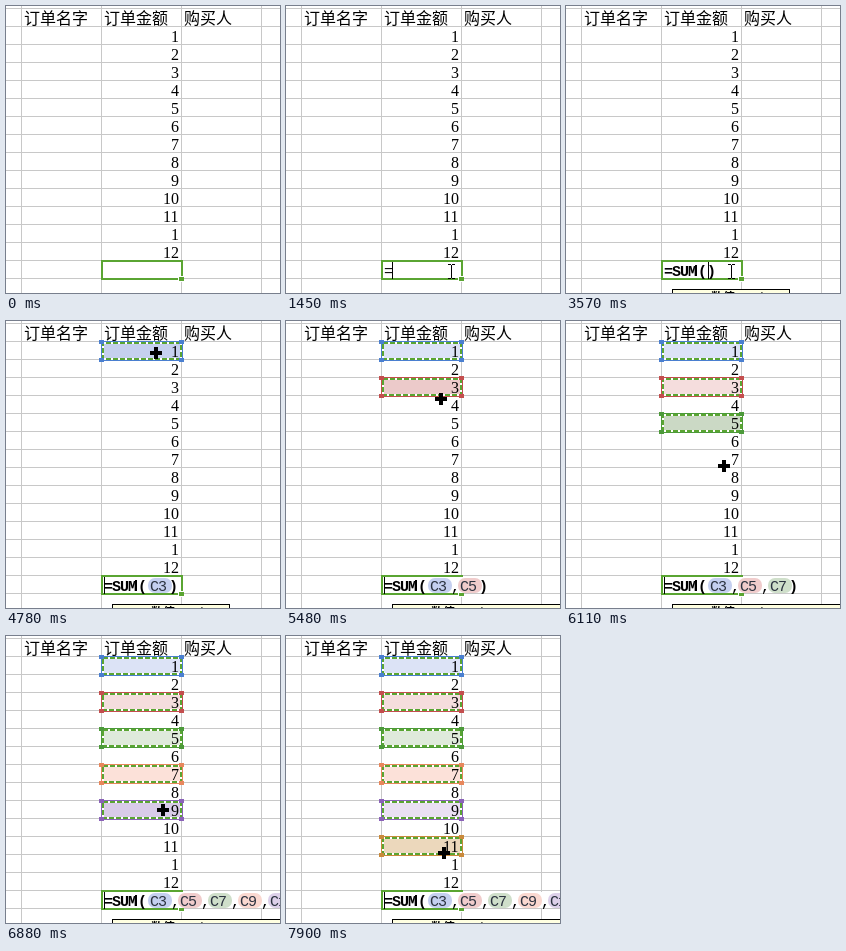
An HTML page with a canvas for the animation above (8000 ms loop, 274x287 px).

```html
<!DOCTYPE html>
<html lang="zh">
<head>
<meta charset="utf-8">
<style>
  html, body { margin: 0; width: 100%; height: 100%; overflow: hidden; background: #fff; }
  canvas { display: block; }
</style>
</head>
<body>
<canvas id="stage" width="274" height="287"></canvas>
<script>
const ctx = document.getElementById('stage').getContext('2d');
const LOOP = 8000, ROW = 18, LEFT = 95, EDIT_Y = 254;
const GREEN = '#5aa532';
const MONO = '15px "Liberation Mono", monospace';
const DIGITS = '16px "Liberation Serif", serif';
const CJK = '"Noto Sans CJK SC", "Noto Sans CJK", sans-serif';
const amounts = [1, 2, 3, 4, 5, 6, 7, 8, 9, 10, 11, 1, 12];

// Ranges picked one after another: every second row from C3 on.
const ranges = [
  { at: 4650, dark: '#4a7fd0', fill: '#dce3f6', active: '#c5d0ee', chip: '#c5d0f0' },
  { at: 5280, dark: '#c44e4e', fill: '#f5dddd', active: '#eccaca', chip: '#f0cccc' },
  { at: 5800, dark: '#4c9a3a', fill: '#dfeadb', active: '#cbd9c5', chip: '#cfdfca' },
  { at: 6320, dark: '#e8875c', fill: '#fce1d9', active: '#f3d1c6', chip: '#fad8d0' },
  { at: 6820, dark: '#8a62b8', fill: '#eae0f3', active: '#d9cbe8', chip: '#ddd0ea' },
  { at: 7300, dark: '#c98a3c', fill: '#f3e4cf', active: '#ecd8bc', chip: '#f0dcc0' }
];

// Pointer waypoints: time, x, y
const path = [
  [190, 187, 287], [330, 178, 258], [430, 166, 242], [570, 165, 265],
  [3820, 165, 265], [4100, 210, 190], [4400, 185, 70], [4600, 150, 32],
  [4900, 150, 32], [5200, 155, 66], [5320, 155, 66], [5740, 156, 102],
  [5850, 156, 102], [6110, 158, 145], [6350, 158, 139], [6780, 157, 174],
  [6950, 157, 174], [7250, 159, 209], [7480, 182, 232], [7720, 158, 213],
  [7880, 158, 217], [8000, 158, 217]
];

function rect(x, y, w, h, color) {
  ctx.fillStyle = color;
  ctx.fillRect(x, y, w, h);
}

function outline(x, y, w, h, color, width) {
  ctx.lineWidth = width;
  ctx.strokeStyle = color;
  ctx.strokeRect(x, y, w, h);
}

function text(str, x, y, font, color = '#000', spacing = '0px') {
  ctx.font = font;
  ctx.letterSpacing = spacing;
  ctx.fillStyle = color;
  ctx.fillText(str, x, y);
}

const code = (str, x, weight = '', color = '#000') =>
  text(str, x, 270, weight + ' ' + MONO, color, '-1px');

const caret = x => rect(x, 256, 1, 17, '#000');

function pointerAt(t) {
  const i = path.findIndex(p => p[0] > t);
  if (i < 1) return null;
  const [t0, x0, y0] = path[i - 1], [t1, x1, y1] = path[i];
  const u = (t - t0) / (t1 - t0), e = u * u * (3 - 2 * u);
  return [Math.round(x0 + (x1 - x0) * e), Math.round(y0 + (y1 - y0) * e)];
}

function drawSheet() {
  rect(0, 0, 274, 287, '#fff');
  for (let x = 15; x < 274; x += 80) rect(x, 0, 1, 287, '#c8c8c8');
  for (let y = 2; y < 287; y += ROW) rect(0, y, 274, 1, '#c8c8c8');
  ['订单名字', '订单金额', '购买人'].forEach((title, i) =>
    text(title, 18 + 80 * i, 18, '300 16px ' + CJK));
}

function drawRange(range, i, isActive, t) {
  const y = 20 + 2 * ROW * i;
  rect(LEFT, y, 81, 19, isActive ? range.active : range.fill);
  outline(LEFT + 0.5, y + 0.5, 81, 19, range.dark, 1);
  outline(LEFT + 2, y + 2, 78, 16, '#fff', 2);
  ctx.setLineDash([5, 2]);
  ctx.lineDashOffset = -Math.floor(t / 65);
  outline(LEFT + 2, y + 2, 78, 16, GREEN, 2);
  ctx.setLineDash([]);
  for (const dx of [0, 80])
    for (const dy of [0, ROW]) rect(LEFT - 2 + dx, y - 1 + dy, 5, 4, range.dark);
}

function drawAmounts() {
  amounts.forEach((n, i) =>
    text(String(n), 173 - 8 * String(n).length, 36 + ROW * i, DIGITS));
}

function drawEditBox(count) {
  rect(LEFT, EDIT_Y, 81, 20, '#fff');
  outline(LEFT + 1, EDIT_Y + 1, 80, ROW, GREEN, 2);
  rect(172, 270, 6, 6, '#fff');
  rect(173, 271, 5, 4, GREEN);
  // A long formula spills over the neighbouring cells.
  if (count > 1) rect(LEFT + 2, EDIT_Y + 2, 48 + 30 * count, 16, '#fff');
}

function drawTyping(t) {
  const typed = t < 1450 ? '' : t < 1700 ? '=' : t < 1770 ? '=S' : t < 1950 ? '=SU' : '=SUM';
  code(typed, 98);
  caret(98 + 8 * typed.length);
  if (t < 1700) return;
  rect(122, 275, 152, 12, '#a0a0a0');
  rect(123, 276, 151, 11, '#fff');
  text(t < 1950 ? 'SEARCH' : 'SUM', 142, 289, '12px "Liberation Sans", sans-serif');
}

function drawFormula(t, count) {
  code('=SUM', 98, 'bold');
  code('(', 132, 'bold');
  rect(129, 259, 2, 11, '#000');
  for (let i = 0; i < count; i++) {
    const x = 142 + 30 * i;
    ctx.fillStyle = ranges[i].chip;
    ctx.beginPath();
    ctx.roundRect(x, 257, 24, 15, 7);
    ctx.fill();
    code('C' + (3 + 2 * i), x + 2, '', '#2c3340');
    if (i < count - 1) code(',', x + 23);
  }
  code(')', count ? 133 + 30 * count : 141, 'bold');
  if (count) caret(98);
  else if (t < 3080 || t >= 3570) caret(142);

  const tipWidth = count > 1 ? 180 : 118;
  rect(106, 283, tipWidth, 4, '#000');
  rect(107, 284, tipWidth - 2, 3, '#ffffe1');
  text('SUM (', 111, 297, '12px ' + CJK);
  text('数值1, ...)', 145, 296, 'bold 12px ' + CJK);
}

function drawPointer(t) {
  const at = pointerAt(t);
  if (!at) return;
  const [x, y] = at;
  if (t >= 500 && t < 3900) {
    rect(x, y - 6, 1, 13, '#000');
    for (const dy of [-7, 7]) {
      rect(x - 3, y + dy, 3, 1, '#000');
      rect(x + 1, y + dy, 3, 1, '#000');
    }
    return;
  }
  rect(x - 6, y - 2, 12, 4, '#000');
  rect(x - 2, y - 6, 4, 12, '#000');
}

function frame(now) {
  const t = now % LOOP;
  const count = ranges.filter(r => t >= r.at).length;
  drawSheet();
  ranges.slice(0, count).forEach((r, i) => drawRange(r, i, i === count - 1, t));
  drawAmounts();
  drawEditBox(count);
  if (t >= 2630) drawFormula(t, count);
  else if (t >= 570) drawTyping(t);
  drawPointer(t);
  requestAnimationFrame(frame);
}
requestAnimationFrame(frame);
</script>
</body>
</html>
```
